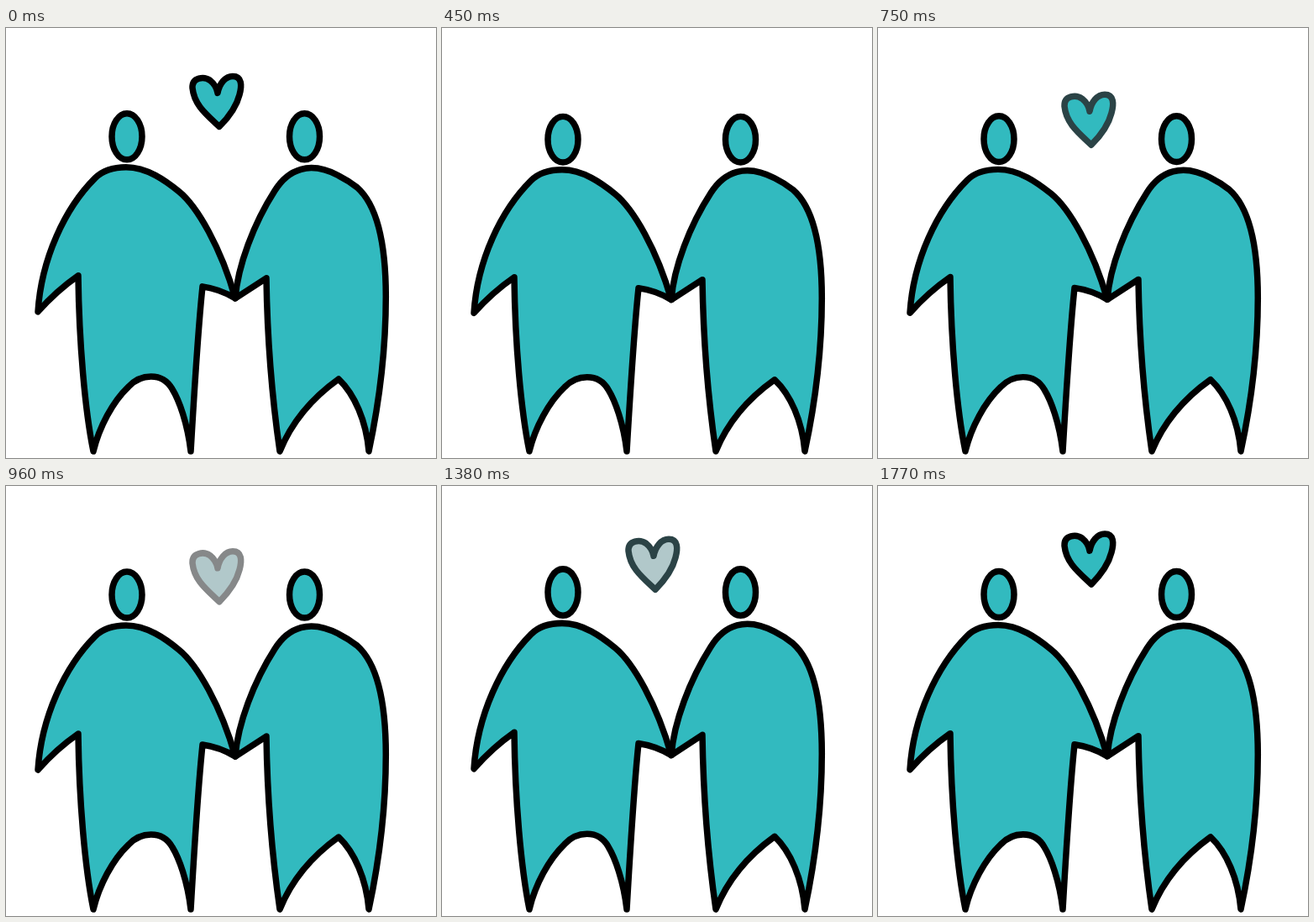
Recreate the animation shown at these times as an HTML page with a canvas. Size 512 by 512 pixels, loop 1800 ms.

```html
<!DOCTYPE html>
<html lang="en">
<head>
<meta charset="utf-8">
<title>Couple with heart</title>
<style>
  html, body { margin: 0; width: 100%; height: 100%; overflow: hidden; background: #fff; }
  canvas { display: block; width: 100vmin; height: 100vmin; }
</style>
</head>
<body>
<canvas id="stage" width="512" height="512"></canvas>
<script>
const ctx = document.getElementById('stage').getContext('2d');
const LOOP = 1800, STEP = 30, GROUND = 504, HEAD_Y = 129.5;
const TEAL = [50, 186, 191], BLACK = [0, 0, 0], WHITE = [255, 255, 255];
const PALETTE = [WHITE, TEAL, [177, 200, 202], [134, 136, 137], [43, 67, 70], BLACK];

const leftBody = new Path2D(`M38 338 C42 275 70 215 106 179 C116 169 129 166 143 166
  C168 166 190 182 206 195 C228 213 256 262 273 322 Q255 311 234 308
  C228 365 223.5 445 220 504 C216 470 206 443 198 430 C186 409 160 412 146 427
  C127 445 111 475 104 504 C94 455 87 375 86 295 Q60 313 38 338 Z`);
const rightBody = new Path2D(`M273 322 C276 283 295 233 320 194 C336 168 362 158 396 176
  C406 181 413 186 418 190 C443 212 452.3 262 452.3 320 C452.3 385 444 448 432 504
  C429 468 415 436 396 418 C368 438 341 467 326 504 C316 435 311 365 310 298
  Q290 311 273 322 Z`);
const heart = new Path2D(`M254 117 C238 102 224 91 222 71 C221.5 58 236 57 243 62
  C248 66 251 71 252 77 C254 66 261 57 270 57 C281 57 281 68 278 79
  C274 95 264 107 254 117 Z`);

function head(x) {
  const p = new Path2D();
  p.ellipse(x, HEAD_Y, 18, 27.5, 0, 0, Math.PI * 2);
  return p;
}
const figures = [leftBody, rightBody, head(144), head(355.5)];

const rgb = c => `rgb(${c.join()})`;
const ease = p => (1 - Math.cos(Math.PI * p)) / 2;

// Fade towards white in the few flat tones of the palette.
function fade(color, alpha) {
  const mix = color.map(v => 255 + (v - 255) * alpha);
  const dist = c => Math.hypot(...c.map((v, i) => v - mix[i]));
  return rgb(PALETTE.reduce((best, c) => dist(c) < dist(best) ? c : best));
}

function keyed(keys, t) {
  const i = keys.findIndex(k => k[0] > t);
  const [t0, a] = keys[i - 1], [t1, b] = keys[i];
  return a + (b - a) * (t - t0) / (t1 - t0);
}
const HEART_ALPHA = [[0, 1], [90, 1], [400, 0], [480, 0], [700, 0.9], [750, 0.82],
  [960, 0.47], [1170, 0.25], [1230, 0.25], [1500, 1], [1800, 1]];

// Head height: rises quickly, sinks more slowly.
function headHeight(t) {
  const low = 590, high = 1310, top = 126.5, bottom = 132.9;
  const sink = t >= low && t < high
    ? 1 - ease((t - low) / (high - low))
    : ease(((t - high + LOOP) % LOOP) / (LOOP - high + low));
  return top + (bottom - top) * sink;
}

function shape(path, fill, line) {
  ctx.fillStyle = fill;
  ctx.strokeStyle = line;
  ctx.fill(path);
  ctx.stroke(path);
}

function draw(t) {
  ctx.fillStyle = '#fff';
  ctx.fillRect(0, 0, 512, 512);
  ctx.lineWidth = 7.5;
  ctx.lineJoin = ctx.lineCap = 'round';

  ctx.save();
  ctx.translate(0, GROUND);
  ctx.scale(1, (GROUND - headHeight(t)) / (GROUND - HEAD_Y));
  ctx.translate(0, -GROUND);
  for (const f of figures) shape(f, rgb(TEAL), '#000');
  ctx.restore();

  const alpha = keyed(HEART_ALPHA, t);
  if (alpha < 0.13) return;
  ctx.save();
  ctx.translate(0, 11.3 * (1 + Math.cos(2 * Math.PI * (t - 805) / LOOP)) - 0.2);
  shape(heart, fade(TEAL, alpha), fade(BLACK, alpha));
  ctx.restore();
}

const start = performance.now();
function tick() {
  const t = (performance.now() - start) % LOOP;
  draw(Math.floor(t / STEP) * STEP);
  requestAnimationFrame(tick);
}
tick();
</script>
</body>
</html>
```
